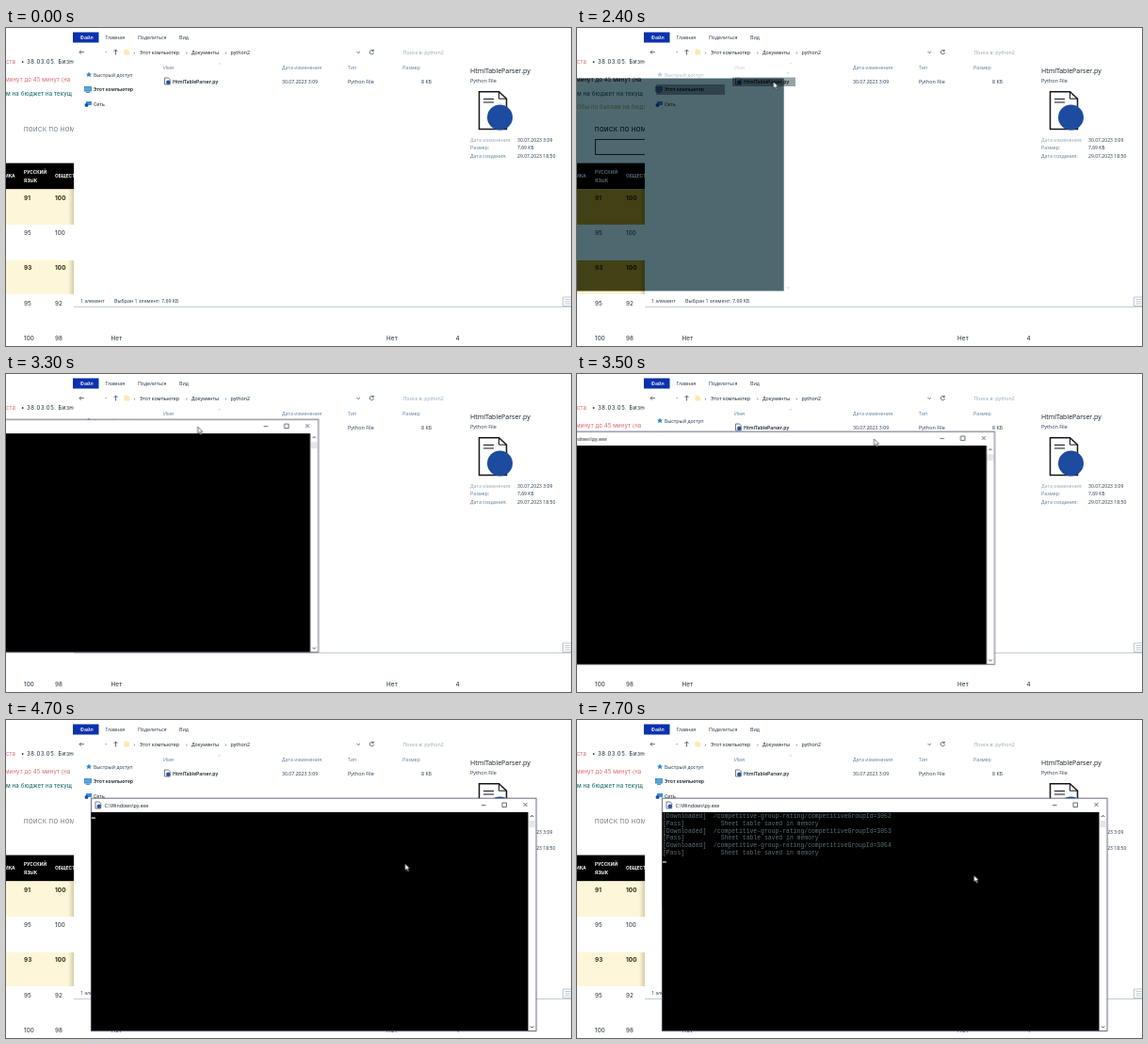
An HTML page for the animation above (8 s loop, 600 px wide and 338 px high).

```html
<!DOCTYPE html>
<html lang="ru">
<head>
<meta charset="utf-8">
<title>Запуск скрипта</title>
<style>
html, body { margin: 0; width: 100%; height: 100%; overflow: hidden; background: #fff; }
svg { display: block; width: 100vw; height: 100vh; }
text { font: 5.3px "Open Sans", "Noto Sans", sans-serif; fill: #22364a; white-space: pre; }
.page text { font-family: Inter, "Noto Sans", sans-serif; font-size: 6.3px; fill: #1c2a33; letter-spacing: .15px; }
.page .bold { font-weight: 700; fill: #2c2a10; }
.page .head { font-size: 4.8px; font-weight: 700; fill: #fff; letter-spacing: 0; }
.page .line { font-size: 6px; }
.page .wide { letter-spacing: .5px; }
.page .red { fill: #d8666c; }
.page .green { fill: #1f6f68; font-weight: 500; }
.page .soft { font-weight: 300; fill: #33434f; }
.dark { fill: #0c1a26; }
.pale { fill: #93a5b2; }
.blue { fill: #5f7c98; }
.strong { font-weight: 600; fill: #0a1824; }
.thin { fill: none; stroke: #22364a; stroke-width: .7; }
.log text { font: 6.43px "Liberation Mono", "DejaVu Sans Mono", monospace; fill: #5a7079; }
.mul { mix-blend-mode: multiply; }

.drag, .ghost, .window, .mouse, .rest { animation: 8s linear infinite; }
.drag { animation-name: drag; }
.ghost { animation-name: ghost; animation-timing-function: step-end; }
.window { animation-name: window; animation-timing-function: step-end; }
.mouse { animation-name: mouse; }
.rest { animation-name: rows; animation-timing-function: step-end; }
.caret { animation: blink 1s -.55s step-end infinite; }

@keyframes ghost {
  0%, 31.15%, 100% { visibility: hidden; }
  29.87% { visibility: visible; }
}
@keyframes window {
  0% { opacity: 0; }
  31.15%, 100% { opacity: 1; }
}
@keyframes drag {
  0%, 37.5% { transform: translate(-328px, -46px); animation-timing-function: cubic-bezier(.4, .1, .7, .6); }
  43.75% { transform: translate(-120px, -22px); }
  47.5% { transform: translate(-1.5px, -1px); animation-timing-function: ease-out; }
  49.5%, 100% { transform: none; }
}
@keyframes mouse {
  0%, 10% { transform: translate(300px, 342px); animation-timing-function: ease-in-out; }
  20%, 31% { transform: translate(208.5px, 57px); animation-timing-function: ease-in-out; }
  36.25% { transform: translate(112px, 48px); }
  37.5% { transform: translate(107px, 45px); animation-timing-function: cubic-bezier(.4, .1, .7, .6); }
  43.75% { transform: translate(315px, 69px); }
  47.5% { transform: translate(433px, 90px); animation-timing-function: ease-out; }
  49.5%, 52.5% { transform: translate(434.5px, 91px); animation-timing-function: ease-in-out; }
  61.25%, 100% { transform: translate(421.5px, 165px); }
}
@keyframes rows {
  0% { transform: none; }
  63.65% { transform: translateY(7.8px); }
  76.15% { transform: translateY(15.6px); }
  79.9% { transform: translateY(23.4px); }
  83.65% { transform: translateY(31.2px); }
  88.65% { transform: translateY(39px); }
  96.15%, 100% { transform: translateY(46.8px); }
}
@keyframes blink { 0% { opacity: 1; } 50%, 100% { opacity: 0; } }
</style>
</head>
<body>
<svg viewBox="0 0 600 338" preserveAspectRatio="none">
  <defs>
    <linearGradient id="shade"><stop offset="0" stop-color="#6a6230" stop-opacity="0"/><stop offset="1" stop-color="#6a6230" stop-opacity=".28"/></linearGradient>
    <g id="file">
      <path d="M.5 .5h4l1.7 1.7v5.3h-5.7z" fill="#fff" stroke="#3c4650" stroke-width=".7"/>
      <circle cx="4.2" cy="5.2" r="2.2" fill="#2454a4"/>
    </g>
  </defs>
  <rect width="600" height="338" fill="#fff"/>

  <g class="page">
    <text x="0" y="37.7" class="line red">ста</text>
    <text x="16" y="37.7" class="line wide">• 38.03.05. Бизнес</text>
    <text x="-1" y="57.3" class="line red">минут до 45 минут (на</text>
    <text x="0" y="71.5" class="line green">м на бюджет на текущ</text>
    <text x="19" y="110.2" class="line wide soft">ПОИСК ПО НОМЕРУ</text>
    <rect y="143.6" width="90" height="27.8" fill="#000"/>
    <text x="-1" y="159" class="head">ИКА</text>
    <text x="19" y="155" class="head">РУССКИЙ</text>
    <text x="19" y="164" class="head">ЯЗЫК</text>
    <text x="52" y="159" class="head">ОБЩЕСТВО</text>
    <rect y="171.4" width="90" height="37.6" fill="#fef6d9"/>
    <rect y="247" width="90" height="36" fill="#fef6d9"/>
    <rect x="66" y="171.4" width="6" height="37.6" fill="url(#shade)"/>
    <rect x="66" y="247" width="6" height="36" fill="url(#shade)"/>
    <text x="19" y="183.2" class="bold">91</text><text x="52" y="183.2" class="bold">100</text>
    <text x="19" y="220.2">95</text><text x="52" y="220.2">100</text>
    <text x="19" y="257.3" class="bold">93</text><text x="52" y="257.3" class="bold">100</text>
    <text x="19" y="295">95</text><text x="52" y="295">92</text>
    <text x="19" y="332">100</text><text x="52" y="332">98</text>
    <text x="111.5" y="332">Нет</text><text x="404" y="332">Нет</text><text x="477.5" y="332">4</text>
    <g class="ghost">
      <text x="-1" y="57.3" class="line">минут до 45 минут (на</text>
      <text x="0" y="86.3" class="line" style="fill:#b0a04a">Обы по баллам на бюджет</text>
      <text x="19" y="110.2" class="line wide">ПОИСК ПО НОМЕРУ</text>
      <rect x="19.5" y="118.500" width="70" height="16" fill="none" stroke="#222f36"/>
    </g>
  </g>

  <g class="explorer">
    <rect x="72" y="-2" width="530" height="298.5" fill="#fff"/>
    <path d="M72 296.500H600" stroke="#b4c2cc" stroke-width=".8"/>
    <rect x="71" y="4.5" width="27.5" height="11" fill="#0b31ac"/>
    <text x="78.5" y="12" style="fill:#fff;font-weight:600">Файл</text>
    <text x="105.5" y="12">Главная</text><text x="140" y="12">Поделиться</text><text x="184" y="12">Вид</text>

    <path class="thin" d="M83 25.7h-5m2-2-2 2 2 2M116.5 28.5v-5.5m-2 2 2-2 2 2M372.5 25l1.7 1.7 1.7-1.7M390.2 24.3a2.2 2.2 0 1 0 .4 1.8m-.4-3.3v1.7h-1.7"/>
    <path d="M105 25.3h2.2l-1.1 1.2z" fill="#8293a0"/>
    <path d="M125.5 22.5h2.5l.8 1h2.2v5h-5.5z" fill="#fbe9ad"/>
    <text x="135.5" y="27.6">›</text><text x="142" y="27.7" class="dark">Этот компьютер</text>
    <text x="191" y="27.6">›</text><text x="197" y="27.7" class="dark">Документы</text>
    <text x="232.5" y="27.6">›</text><text x="238.5" y="27.7" class="dark">python2</text>
    <text x="421.5" y="27.7" class="pale">Поиск в: python2</text>

    <path d="M225.5 38.5l1.3-1.2 1.3 1.2" fill="none" stroke="#9aabb8" stroke-width=".5"/>
    <text x="167" y="44.3" class="blue">Имя</text><text x="293" y="44.3" class="blue">Дата изменения</text>
    <text x="363" y="44.3" class="blue">Тип</text><text x="421" y="44.3" class="blue">Размер</text>

    <path d="M88 46.500l1 2 2 .2-1.5 1.4.5 2.1-2-1.100-2 1.100.5-2.100-1.500-1.400 2-.2z" fill="#3585d0"/>
    <text x="93" y="51.5">Быстрый доступ</text>
    <rect x="83.5" y="62.5" width="7" height="4.6" fill="#4ca9ea" stroke="#1c4f88" stroke-width=".5"/><path d="M85 68.3h4" stroke="#1c4f88" stroke-width=".8"/>
    <text x="93" y="67.3" class="strong" style="font-size:5.1px">Этот компьютер</text>
    <rect x="85" y="78" width="6" height="4" fill="#3f8edb"/><circle cx="85.5" cy="82" r="2" fill="#1d4fa0"/>
    <text x="93" y="83.3" class="dark">Сеть</text>

    <use href="#file" x="168" y="52.5"/>
    <text x="177" y="58.5" class="strong" style="font-size:5.1px">HtmlTableParser.py</text>
    <text x="293" y="58.5" style="font-size:5.2px">30.07.2023 3:09</text>
    <text x="363" y="58.5" style="font-size:5.4px">Python File</text>
    <text x="441" y="58.5">8 КБ</text>

    <text x="493" y="48" class="dark" style="font-size:7px">HtmlTableParser.py</text>
    <text x="493" y="58" style="font-size:5.4px">Python File</text>
    <path d="M502.5 67.700h21l8 7.500v32.300h-29z" fill="#fff" stroke="#10161c" stroke-width="1.5"/>
    <path d="M523.5 67.700v7.500h8M507 75.500h11M507 79h11" fill="none" stroke="#10161c" stroke-width="1"/>
    <circle cx="524.5" cy="95" r="13.5" fill="#1d4b9f"/>
    <text x="493" y="120.5" class="pale">Дата изменения:</text><text x="543" y="120.5" style="font-size:5.1px">30.07.2023 3:09</text>
    <text x="493" y="129.4" class="blue">Размер:</text><text x="543" y="129.4" style="font-size:5.1px">7,69 КБ</text>
    <text x="493" y="138" class="blue">Дата создания:</text><text x="543" y="138" style="font-size:5.1px">29.07.2023 18:50</text>

    <text x="79" y="292.4">1 элемент</text><text x="115" y="292.4">Выбран 1 элемент: 7,69 КБ</text>
    <path d="M591.5 286h9m-9 9.5h9m-9-9.5v9.5M593.5 288.5h6m-6 2.3h6m-6 2.3h6" fill="none" stroke="#9fb0bd" stroke-width=".7"/>
  </g>

  <!-- console shade while it opens -->
  <g class="ghost">
    <rect y="38" width="229" height="15.500" fill="#fff" opacity=".65"/>
    <rect class="mul" y="53.500" width="219.700" height="226" fill="#4e6870"/>
    <path class="mul" d="M0 171.400h72v37.600h-72zM0 247h72v32.500h-72z" fill="#d6a636"/>
    <path class="mul" d="M84 60h73v11h-73zM165 52.500h67v9.500h-67z" fill="#98a3a8"/>
    <path d="M223 48.500l1-1 1 1M223 275.500l1 1 1-1" fill="none" stroke="#8a979e" stroke-width=".6"/>
  </g>

  <g class="drag"><g class="window">
    <rect x="89.5" y="82" width="475" height="250" rx="1" fill="#31404c" opacity=".1"/>
    <rect x="90.4" y="83.2" width="472.6" height="247.3" fill="#fff" stroke="#5b5a76" stroke-width=".8"/>
    <rect x="90.5" y="98" width="464" height="232.2" fill="#000"/>
    <use href="#file" x="94.5" y="86.5"/>
    <text x="104.5" y="92.5" class="dark">C:\Windows\py.exe</text>
    <path class="thin" d="M505 90.5h4.5M527 88h4.5v4.5h-4.5zM549.5 88l4 4m0-4-4 4"/>
    <rect x="555.3" y="107" width="6.4" height="7" fill="#e2e7ea"/>
    <path d="M557 103l1.6-1.6 1.6 1.6M557 325.5l1.6 1.6 1.6-1.6" fill="none" stroke="#1c2830" stroke-width=".9"/>
    <g class="log">
      <text x="91" y="104">[Downloaded]  /competitive-group-rating/competitiveGroupId=3052</text>
      <text x="91" y="111.8">[Pass]          Sheet table saved in memory</text>
      <text x="91" y="119.6">[Downloaded]  /competitive-group-rating/competitiveGroupId=3053</text>
      <text x="91" y="127.4">[Pass]          Sheet table saved in memory</text>
      <text x="91" y="135.2">[Downloaded]  /competitive-group-rating/competitiveGroupId=3054</text>
      <text x="91" y="143">[Pass]          Sheet table saved in memory</text>
    </g>
    <g class="rest">
      <rect x="90.8" y="98.3" width="300" height="52" fill="#000"/>
      <rect class="caret" x="90.8" y="103.5" width="4" height="1.3" fill="#e4eaec"/>
    </g>
  </g></g>

  <path class="mouse" d="M0 0v7.200l1.700-1.500 1.200 2.700 1.300-.6-1.200-2.600h2.200z" fill="#fff" stroke="#111" stroke-width=".6"/>
</svg>
</body>
</html>
```
